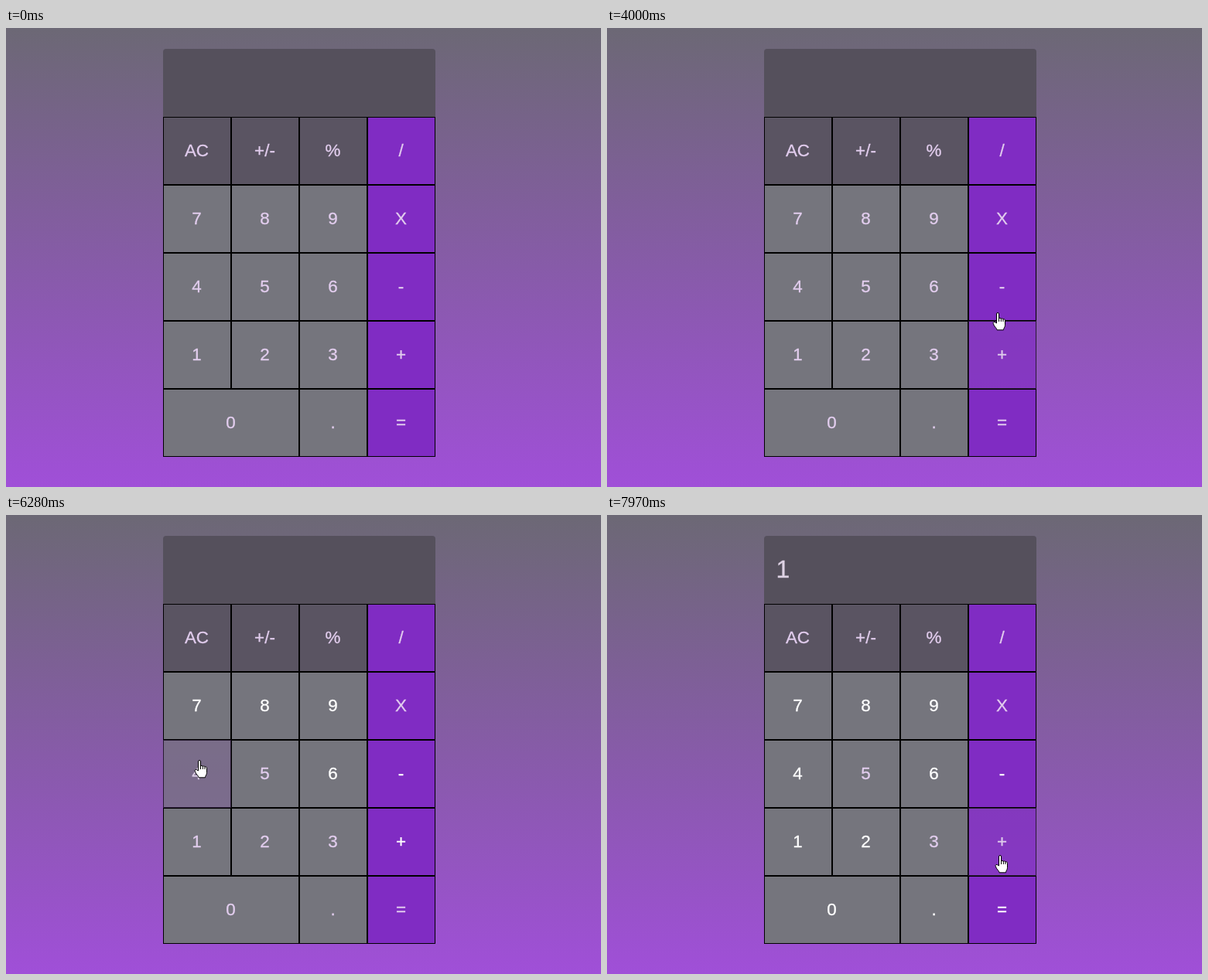
An HTML page for the animation above (8000 ms loop, 769 px wide and 594 px high).

```html
<!DOCTYPE html>
<html lang="en">
<head>
<meta charset="utf-8">
<title>Calculator</title>
<style>
html, body { margin: 0; width: 100%; height: 100%; overflow: hidden; }
body { position: relative; background: linear-gradient(#6c6875, #a04fd8); }
#calc {
  position: absolute; left: 202.5px; top: 27px; width: 352px;
  display: grid; grid-template-columns: repeat(4, 88px); grid-auto-rows: 88px;
  font: 22.4px "Liberation Sans", Arial, sans-serif; color: #e2cdee;
  -webkit-text-stroke: .3px;
}
#calc div { box-sizing: border-box; display: flex; align-items: center; justify-content: center; }
#calc #screen {
  grid-column: span 4; justify-content: flex-start; padding: 0 16px 2px;
  background: #55505c; border-radius: 4px 4px 0 0; font-size: 32px; color: #ded2e4;
}
.key { border: 1px solid #000; background: #75757d; }
.top { background: #5a5462; }
.op { background: #802cc3; }
.wide { grid-column: span 2; }
#calc .seen { color: #fff; }
.lit { opacity: .7; }
svg { position: absolute; left: 0; top: 0; }
</style>
</head>
<body>
<div id="calc"><div id="screen"></div></div>
<svg width="769" height="594">
  <circle id="dot" cx="250" cy="417" r="12" fill="rgba(218,204,24,.7)"/>
  <g id="cursor" fill="#fff" stroke="#000" stroke-linejoin="round">
    <path id="arrow" d="M.5.5V16l3.6-3.4 2.6 6 2.2-1-2.6-5.8h5z"/>
    <g id="hand" transform="translate(-6.5 -1)">
      <path d="M5 13V2q0-1.5 1.5-1.5T8 2V8.5q0-1.2 1.4-1.2t1.4 1.6q0-1.2 1.4-1t1.3 1.6q.1-1 1.3-.7t1.2 1.5v6q0 2-1 3.5t-1 3h-8.5q0-1.5-2-3.5T.8 14.5q-.6-1.5.6-2T5 14z"/>
      <path fill="none" d="M8 8v4M10.8 9v3M13.5 9.5V12"/>
    </g>
  </g>
</svg>
<script>
const LOOP = 8000, STEP = 70, CELL = 88, PRESS = 6940;
const $ = id => document.getElementById(id);
const layout = 'AC +/- % / 7 8 9 X 4 5 6 - 1 2 3 + 0 0 . ='.split(' ');

// Pointer moves: start, end, x and y reached; it rests in between
const moves = [
  [1040, 1110, 742, 584], [1110, 1270, 800, 600],
  [2450, 3060, 657, 406],
  [3660, 3870, 545, 392], [3870, 4070, 432, 325],
  [4270, 4690, 290, 205], [4690, 5090, 244, 250],
  [5090, 5480, 272, 284], [5480, 5750, 250, 272],
  [6140, 6280, 250, 318], [6470, 6740, 250, 417],
  [7200, 7410, 336, 474], [7410, 7690, 461, 495], [7690, 7970, 508, 441]
];

function pointerAt(t) {
  let x = 800, y = 600;
  for (const [start, end, toX, toY] of moves) {
    if (t < start) break;
    const hop = Math.floor((t - start) / STEP) * STEP;
    const u = t < end ? hop / (end - start) : 1;
    x += (toX - x) * u;
    y += (toY - y) * u;
  }
  return [Math.round(x), Math.round(y)];
}

function keyAt([x, y]) {
  const col = Math.floor((x - 203) / CELL), row = Math.floor((y - 115) / CELL);
  return col >= 0 && col < 4 && row >= 0 && row < 5 ? layout[row * 4 + col] : null;
}

const keys = {};
for (const name of new Set(layout)) {
  const el = document.createElement('div');
  el.textContent = name;
  el.className = 'key';
  if (['AC', '+/-', '%'].includes(name)) el.classList.add('top');
  if ('/X-+='.includes(name)) el.classList.add('op');
  if (name === '0') el.classList.add('wide');
  $('calc').append(el);
  keys[name] = el;
}

// Highlights trail the pointer by one hop
const hovers = [];
for (let t = 0; t < LOOP; t += 10) {
  const key = keyAt(pointerAt(t));
  if (key && key !== hovers.at(-1)?.key) hovers.push({ key, time: t + STEP });
}

function show(el, on) {
  el.style.display = on ? '' : 'none';
}

function draw(now) {
  const t = now % LOOP;
  const past = hovers.filter(h => h.time <= t).map(h => h.key);
  for (const name in keys) {
    keys[name].classList.toggle('seen', past.includes(name));
    keys[name].classList.toggle('lit', name === past.at(-1));
  }
  $('cursor').setAttribute('transform', `translate(${pointerAt(t)})`);
  show($('arrow'), !past.length);
  show($('hand'), past.length);
  show($('dot'), t >= PRESS && t < PRESS + 2 * STEP);
  $('screen').textContent = t >= PRESS + 2 * STEP ? '1' : '';
  requestAnimationFrame(draw);
}
requestAnimationFrame(draw);
</script>
</body>
</html>
```
